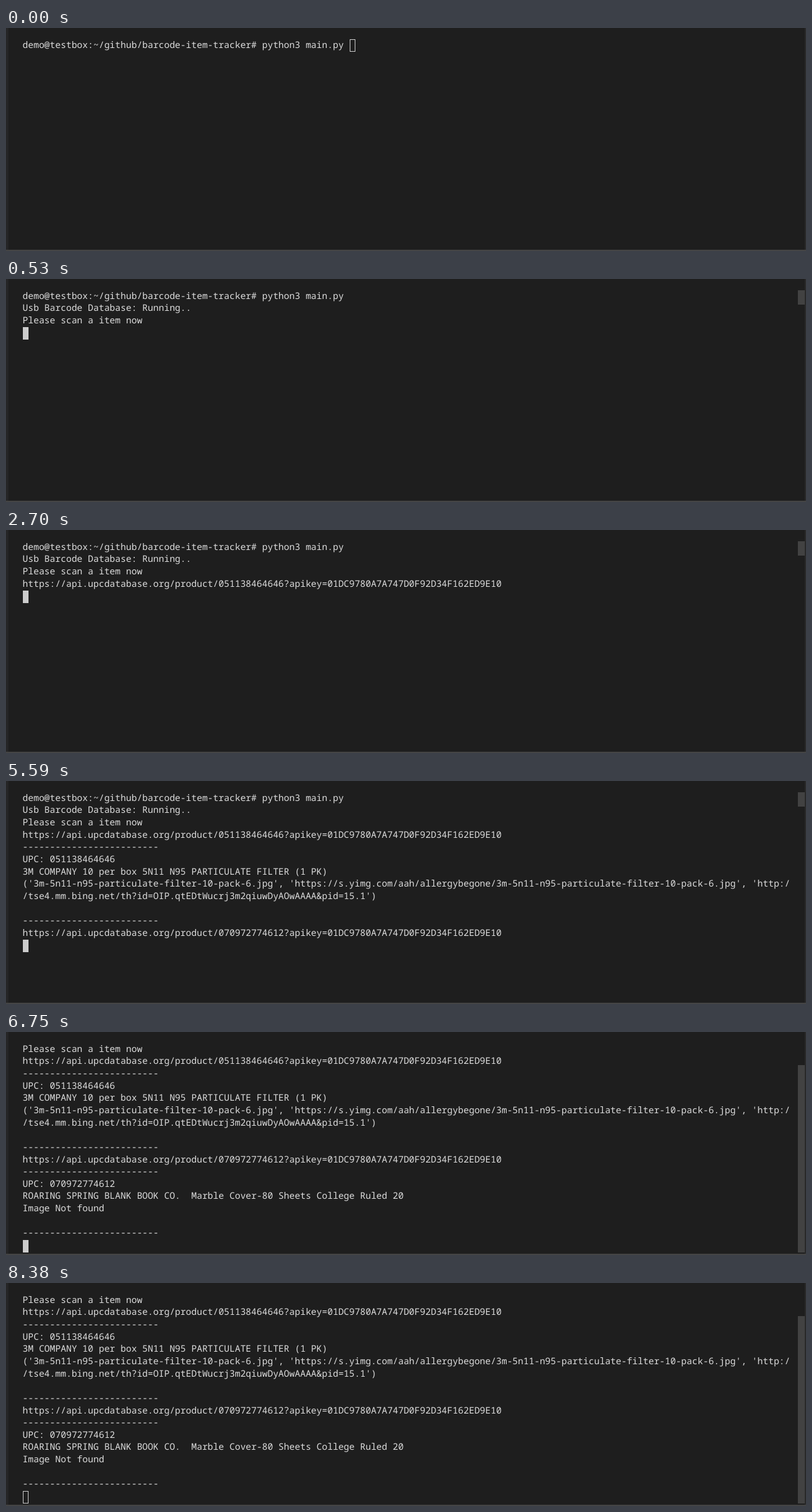
Write an HTML page that moves like this. It is 1280x357 px and loops after 8460 ms.

```html
<!DOCTYPE html>
<html lang="en">
<head>
<meta charset="utf-8">
<title>Terminal session</title>
<style>
  html, body { margin: 0; width: 100%; height: 100%; overflow: hidden; background: #1e1e1e; }
  div, pre { position: absolute; box-sizing: border-box; margin: 0; }
  #screen {
    left: 26.5px; top: 17.6px; color: #dcdcdc; white-space: pre;
    font: 14.52px/19.66px "Noto Sans Mono", monospace;
    font-variant-ligatures: none; text-rendering: geometricPrecision;
  }
  #cursor { width: 9px; height: 20px; border: 1px solid #ccc; }
  #thumb { left: 1267px; width: 11px; background: #424242; }
  #left { left: 0; top: 0; width: 4px; height: 355px; background: #252526; }
  #right { left: 1278px; top: 0; width: 2px; height: 355px; background: #292929; }
  #bottom { left: 0; top: 355px; width: 1280px; height: 2px; background: #444; }
</style>
</head>
<body>
<div id="left"></div>
<div id="right"></div>
<div id="bottom"></div>
<pre id="screen"></pre>
<div id="cursor"></div>
<div id="thumb"></div>
<script>
const LOOP = 8460, LEFT = 27, TOP = 18, ROW = 19.66, COLUMN = 8.712;
const rule = "-".repeat(25);
const lookup = upc =>
  `https://api.upcdatabase.org/product/${upc}?apikey=01DC9780A7A747D0F92D34F162ED9E10`;

const lines = [
  "demo@testbox:~/github/barcode-item-tracker# python3 main.py ",
  "Usb Barcode Database: Running..",
  "Please scan a item now",
  lookup("051138464646"),
  rule,
  "UPC: 051138464646",
  "3M COMPANY 10 per box 5N11 N95 PARTICULATE FILTER (1 PK)",
  "('3m-5n11-n95-particulate-filter-10-pack-6.jpg', 'https://s.yimg.com/aah/allergybegone/3m-5n11-n95-particulate-filter-10-pack-6.jpg', 'http:/",
  "/tse4.mm.bing.net/th?id=OIP.qtEDtWucrj3m2qiuwDyAOwAAAA&pid=15.1')",
  "",
  rule,
  lookup("070972774612"),
  rule,
  "UPC: 070972774612",
  "ROARING SPRING BLANK BOOK CO.  Marble Cover-80 Sheets College Ruled 20",
  "Image Not found",
  "",
  rule
];

// count: lines printed so far; thumb: top and bottom of the scrollbar
const shortThumb = [18, 41], longThumb = [53, 353];
const states = [
  { at: 0, count: 1, column: 60, focused: false, thumb: [0, 0] },
  { at: 70, count: 1, thumb: shortThumb },
  { at: 530, count: 3, thumb: shortThumb },
  { at: 2700, count: 4, thumb: shortThumb },
  { at: 4260, count: 11, thumb: shortThumb },
  { at: 5590, count: 12, thumb: shortThumb },
  { at: 6750, count: 18, scroll: 2, thumb: longThumb },
  { at: 8380, count: 18, scroll: 2, focused: false, thumb: longThumb }
];

const [screenEl, cursorEl, thumbEl] =
  ["screen", "cursor", "thumb"].map(id => document.getElementById(id));
let shown;

function show({ count, column = 0, scroll = 0, focused = true, thumb }) {
  const row = column ? count - 1 : count - scroll;
  screenEl.textContent = lines.slice(scroll, count).join("\n");
  cursorEl.style.left = LEFT + column * COLUMN + "px";
  cursorEl.style.top = TOP + row * ROW + "px";
  cursorEl.style.background = focused ? "#ccc" : "none";
  thumbEl.style.top = thumb[0] + "px";
  thumbEl.style.height = thumb[1] - thumb[0] + "px";
}

function tick() {
  const time = performance.now() % LOOP;
  const state = states.findLast(s => s.at <= time);
  if (state !== shown) show(shown = state);
  requestAnimationFrame(tick);
}
tick();
</script>
</body>
</html>
```
